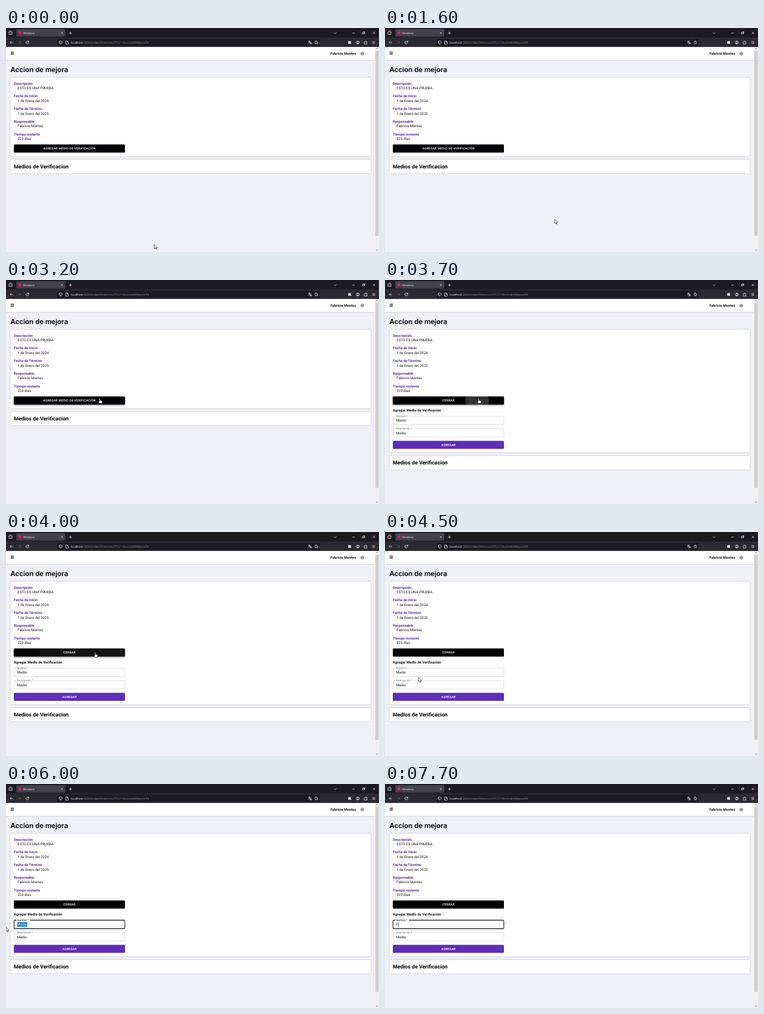
Recreate the animation shown at these times as an HTML page. Size 668 by 402 pixels, loop 8000 ms.

```html
<!DOCTYPE html>
<html lang="es">
<head>
<meta charset="utf-8">
<title>Veltadora</title>
<style>
  html, body { margin: 0; width: 100%; height: 100%; overflow: hidden; background: #f0f1f7; }
  svg { display: block; width: 668px; height: 402px; }
  text { font: 6.35px Roboto, sans-serif; fill: #111; text-rendering: geometricPrecision; white-space: pre; }
  .b { font-weight: 700; }
  .key { font-weight: 700; fill: #5a2bb0; }
  .h1 { font: 600 12.3px Inter, sans-serif; fill: #000; }
  .h2 { font-size: 9.53px; font-weight: 700; fill: #000; }
  .btn { font-size: 5.56px; font-weight: 500; letter-spacing: .0286em; fill: #fff; text-anchor: middle; }
  .lab { font-size: 4.76px; fill: #666; }
  .ui { font: 4.7px "Open Sans", sans-serif; fill: #fbfbfe; }
  .url { font-size: 5.2px; fill: #8f8f9b; }
  .card { fill: #fff; filter: drop-shadow(0 .4px 1px rgba(0,0,0,.3)); }
  .raise { filter: drop-shadow(0 .8px .7px rgba(0,0,0,.4)); }
  .raise.hover { filter: drop-shadow(0 1.4px 1.6px rgba(0,0,0,.55)); }
  .box { fill: none; stroke: #bfbfbf; stroke-width: .6; }
  .box.focus { stroke: #000; stroke-width: 1.1; }
  .ic { fill: none; stroke: #e8e8ee; stroke-width: .75; stroke-linecap: round; stroke-linejoin: round; }
  .dark { stroke: #555; }
  .ptr { fill: #fff; stroke: #111; stroke-width: .7; stroke-linejoin: round; }
</style>
</head>
<body>
<svg viewBox="0 0 668 402">
  <defs><clipPath id="clip"><rect x="14" y="209" width="199" height="14.5" rx="1.5"/></clipPath></defs>
  <rect width="668" height="402" fill="#f0f1f7"/>

  <!-- page header -->
  <rect y="30" width="661" height="27.5" class="card"/>
  <g fill="#555"><rect x="8.5" y="42.6" width="5.6" height="5.4" fill="#aaa"/>
    <path d="M8.5 42.6h5.6v1h-5.6zM8.5 44.8h5.6v1h-5.6zM8.5 47h5.6v1h-5.6z"/></g>
  <text class="b" x="581" y="48.2">Fabricio Montes</text>
  <circle class="ic dark" cx="638" cy="46" r="2.2"/>
  <circle class="ic dark" cx="638" cy="46" r="2.8" stroke-dasharray="1.1 1.1" stroke-linecap="butt"/>
  <circle cx="638" cy="46" r=".9" fill="#555"/>

  <!-- browser frame -->
  <rect width="668" height="17" fill="#1c1b22"/>
  <rect y="17" width="668" height="17" fill="#2b2a33"/>
  <rect x="18.5" y="2" width="87.5" height="13.5" rx="1.6" fill="#42414d"/>
  <rect x="92" y="19.3" width="470" height="13" rx="1.6" fill="#1c1b22"/>
  <rect x="22" y="6" width="5.4" height="5.4" fill="#e5127d"/>
  <text class="ui" x="30" y="10.6">Veltadora</text>
  <text class="ui url" x="116" y="27.9"><tspan fill="#fbfbfe">localhost</tspan>:3000/Index/Direccion/PTCI/1/AccionesMejora/94</text>
  <path class="ic" d="M5.5 7h5.4v4.5h-5.4zM6.3 5.3h3.8M7.2 9l1 1 1-1
    M98.7 7.5l2.8 2.8m0-2.8l-2.8 2.8M113 9h4.6M115.3 6.7v4.6
    M587.2 8l2.2 2.2 2.2-2.2M620.5 9h3.6M638.8 7.8h2.8v2.8h-2.8zM639.8 7.8v-1h2.8v2.8h-1M657.2 7.2l3.4 3.4m0-3.4l-3.4 3.4
    M12.5 26h-5m2-2.1l-2.1 2.1 2.1 2.1
    M40.4 24.4a2.6 2.6 0 1 0 .4 2.2M40.8 23v1.8h-1.8
    M98 23.2l2.5 .9c0 2.5-.6 4-2.5 5-1.9-1-2.5-2.5-2.5-5z
    M107.2 23.3h2.6l1.7 1.7v4h-4.3zM109.6 23.5v1.7h1.7
    M541.5 24h3.4M543.2 23v1M544.3 24c-.4 1.7-1.3 2.6-2.6 3.2M542.2 25.2l2 1.6M544.2 29l1.6-3.8 1.6 3.8M544.8 27.8h2
    M555.6 22.9l.9 1.9 2.1.3-1.5 1.5.3 2.1-1.8-1-1.8 1 .3-2.1-1.5-1.5 2.1-.3z
    M641.8 24.6h1.5c0-1.9 1.8-1.9 1.8 0h1.4v1.5c-1.7 0-1.7 1.6 0 1.6v1.2h-4.7z
    M656.6 24.2h3.8M656.6 26h3.8M656.6 27.8h3.8"/>
  <path class="ic" opacity=".3" d="M21.5 26h5m-2-2.1l2.1 2.1-2.1 2.1"/>
  <rect x="613" y="23.6" width="4.8" height="4.8" fill="#e8e8ee"/>
  <circle class="ic" cx="630" cy="26" r="2.8"/><circle cx="630" cy="25.3" r="1" fill="#e8e8ee"/>
  <path d="M628.2 27.7q1.8-1.6 3.6 0-1.8 1.4-3.6 0z" fill="#e8e8ee"/>

  <!-- scrollbar -->
  <rect x="661" y="34" width="7" height="368" fill="#f0f0f0"/>
  <rect x="661.5" y="41" width="6" height="332" fill="#cdcdcd"/>
  <path class="ic dark" d="M663 38l1.6-1.6 1.6 1.6M663 398l1.6 1.6 1.6-1.6"/>

  <text class="h1" x="8" y="79">Accion de mejora</text>
  <rect id="card" class="card" x="8" y="89" width="645.5" height="141.4" rx="1"/>
  <g id="rows"></g>
  <g id="toggle" class="raise"><rect x="14" y="209" width="199" height="14.5" rx="1.5"/></g>
  <g clip-path="url(#clip)"><circle id="ripple" cx="165" cy="216" fill="#fff"/></g>
  <text id="toggleText" class="btn" x="113.7" y="218.1"></text>

  <g id="form">
    <text class="b" x="14" y="236.2">Agregar Medio de Verificación</text>
    <rect id="field" class="box" x="14.4" y="244.4" width="198.4" height="15.2" rx="1.5"/>
    <rect x="18.5" y="242.5" width="24.5" height="3.5" fill="#fff"/>
    <text id="label" class="lab" x="20" y="245.7">Nombre *</text>
    <text id="value" x="20" y="254.3"></text>
    <svg id="sel" y="248" height="8"><rect width="668" height="8" fill="#0078d7"/><text id="selText" y="6.3" style="fill:#fff">Medio</text></svg>
    <rect id="caret" x="23.9" y="248.3" width=".5" height="7.4" fill="#000"/>
    <rect class="box" x="14.4" y="266.6" width="198.4" height="15.2" rx="1.5"/>
    <rect x="18.5" y="265" width="32" height="3.2" fill="#fff"/>
    <text class="lab" x="20" y="267.9">Descripción *</text>
    <text x="20" y="276.5">Medio</text>
    <rect class="raise" x="14" y="288.7" width="199" height="14.2" rx="1.5" fill="#5e2eb8"/>
    <text class="btn" x="113.7" y="297.6">AGREGAR</text>
  </g>

  <g id="list">
    <rect class="card" x="8" y="236.3" width="645.5" height="24.4" rx="1"/>
    <text class="h2" x="14" y="252">Medios de Verificacion</text>
  </g>

  <g id="cursor">
    <path id="arrow" class="ptr" d="M0 0v7.6l1.8-1.6 1.2 2.7 1.2-.5-1.2-2.6h2.4z"/>
    <path id="hand" class="ptr" d="M-1 .7q.8-1 1.5 0v3l3 .7q.9.3.8 1.3l-.6 3.4h-4.4l-2.3-3.3q.2-1.2 2 .2z"/>
    <path id="beam" fill="none" stroke="#111" stroke-width=".7" d="M-1.4-3.6h2.8M0-3.6v7.2M-1.4 3.6h2.8"/>
  </g>
</svg>
<script>
const $ = id => document.getElementById(id);
const LOOP = 8000, OPEN = 3700, FOCUS = 4800, TYPED = 7700;

// pointer track: time, x, y
const track = [
  [0, 265.5, 388.5], [100, 265.5, 388.5], [200, 266, 388.3], [400, 266, 388.3], [600, 266, 388],
  [700, 266, 386], [1000, 304, 348], [1200, 304, 348], [1400, 304, 344], [1500, 304, 344],
  [1600, 304, 343.3], [2400, 606, 13], [3200, 168, 212.3], [3900, 168, 212.3],
  [4500, 60, 261], [4800, 38, 252], [5300, 2, 257], [5400, 2, 257], [5500, 0, 257], [LOOP, 0, 257]
];

const rows = [
  ['Descripción', 'ESTO ES UNA PRUEBA'], ['Fecha de Inicio', '1 de Enero del 2024'],
  ['Fecha de Término', '1 de Enero del 2025'], ['Responsable', 'Fabricio Montes'],
  ['Tiempo restante', '223 días']
];
$('rows').innerHTML = rows.map(([key, val], i) => {
  const y = 101.7 + i * 22.7;
  return `<text class="key" x="14" y="${y}">${key}</text><text x="20.8" y="${y + 8.6}">${val}</text>`;
}).join('');

const show = (id, on) => $(id).style.display = on ? '' : 'none';
const set = (id, attrs) => { for (const k in attrs) $(id).setAttribute(k, attrs[k]); };

function pointer(t) {
  const i = track.findIndex(k => k[0] > t);
  const [t0, x0, y0] = track[i - 1], [t1, x1, y1] = track[i];
  const u = (t - t0) / (t1 - t0), e = u * u * (3 - 2 * u);
  return [x0 + (x1 - x0) * e, y0 + (y1 - y0) * e];
}

function draw(t) {
  const [x, y] = pointer(t);
  const open = t >= OPEN, focus = t >= FOCUS, typed = t >= TYPED;

  show('form', open);
  set('card', { height: open ? 220.6 : 141.4 });
  set('list', { transform: `translate(0 ${open ? 79.4 : 0})` });
  $('toggleText').textContent = open ? 'CERRAR' : 'AGREGAR MEDIO DE VERIFICACIÓN';

  const hover = x > 14 && x < 213 && y > 209 && y < 223.5;
  $('toggle').classList.toggle('hover', hover);
  const p = Math.min(1, (t - OPEN) / 500);
  set('ripple', { r: open ? 21 + 140 * p : 0, opacity: open ? .2 * (1 - p) : 0 });

  $('field').classList.toggle('focus', focus);
  $('label').style.fill = focus ? '#000' : '';
  $('value').textContent = typed ? 'F' : 'Medio';
  const left = Math.min(38, Math.max(20, x));
  show('sel', focus && !typed && left < 37.7);
  set('sel', { x: left, width: 38 - left });
  set('selText', { x: 20 - left });
  show('caret', typed);

  const beam = open && x > 14 && x < 213 && y > 244 && y < 260;
  show('cursor', !typed);
  set('cursor', { transform: `translate(${x} ${y})` });
  show('hand', hover);
  show('beam', beam);
  show('arrow', !hover && !beam);
}

const start = performance.now();
function tick() {
  const t = (performance.now() - start) % LOOP;
  draw(Math.floor(t / 100) * 100);
  requestAnimationFrame(tick);
}
tick();
</script>
</body>
</html>
```
